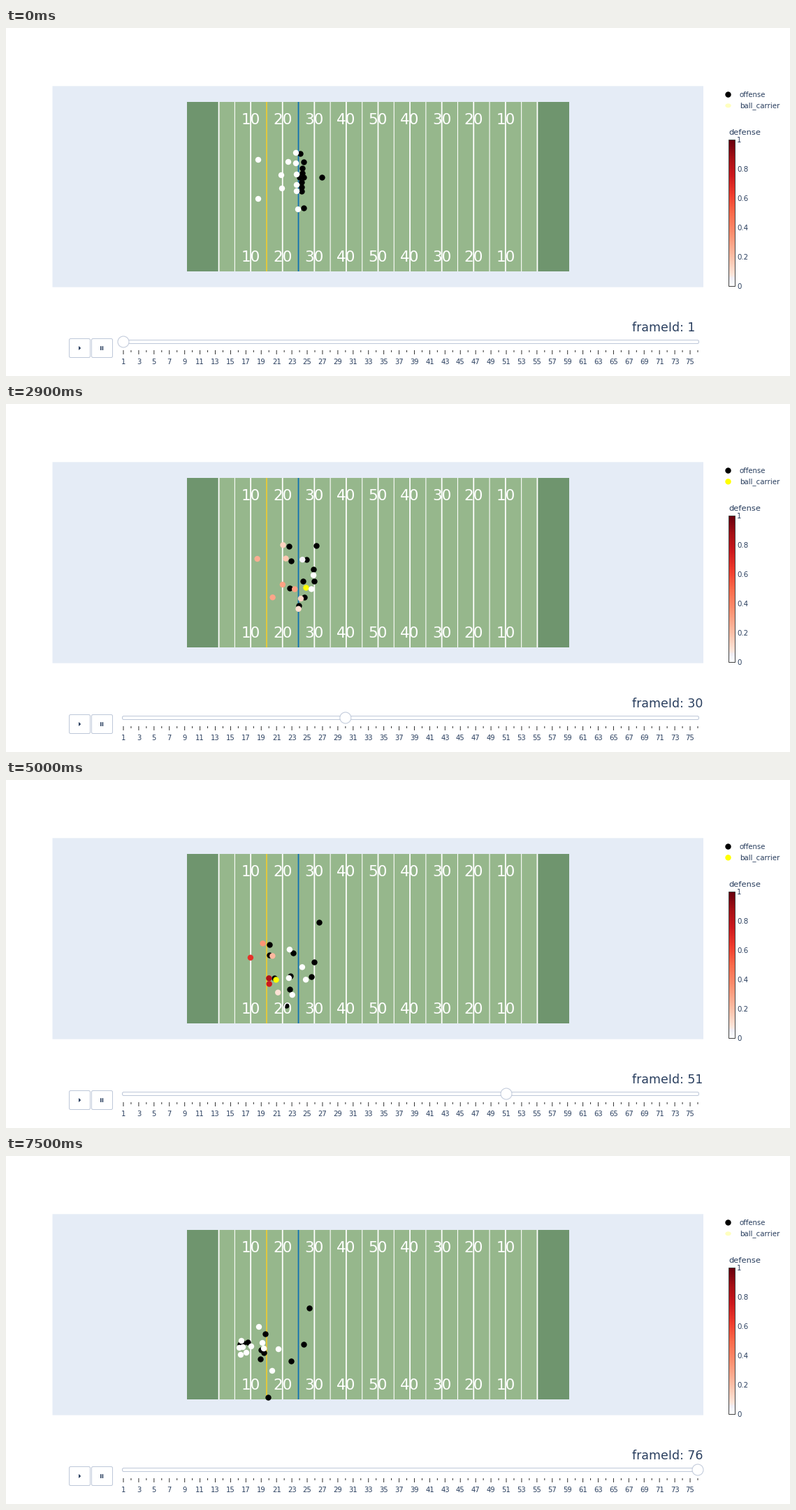
These frames come from a looping animation (1122x499 px, 7.6 s). A matplotlib script:

```python
import numpy as np
import matplotlib.pyplot as plt
from matplotlib.animation import FuncAnimation
from matplotlib.colors import LinearSegmentedColormap
from matplotlib.patches import Circle, Ellipse, FancyBboxPatch, Polygon, Rectangle

W, H, DPI = 1122, 499, 100
FRAMES, INTERVAL = 76, 100
SNAP, HANDOFF, WHISTLE = 6, 19, 71
INK, BORDER = "#2a3f5f", "#bec8d9"
PX = 72 / DPI

plt.rcParams["font.family"] = "DejaVu Sans"

# Every player runs a smooth route: line-up, halfway spot, final spot.
KEYS = np.array([8, 40, 76])
ROUTES = {
    "blockers": [
        [(424, 201), (396, 239), (339, 268)],
        [(424, 208), (445, 252), (426, 270)],
        [(420, 214), (422, 273), (369, 282)],
        [(423, 221), (446, 271), (408, 294)],
        [(423, 228), (395, 280), (365, 278)],
        [(423, 234), (423, 296), (364, 291)],
    ],
    "receivers": [
        [(421, 180), (393, 219), (346, 267)],
        [(426, 192), (427, 239), (371, 255)],
        [(426, 258), (413, 307), (375, 346)],
    ],
    "quarterback": [[(426, 214), (451, 200), (434, 218)]],
    "runner": [[(452, 214), (412, 284), (335, 270)]],
    "front": [
        [(415, 194), (423, 237), (362, 245)],
        [(416, 210), (444, 262), (367, 268)],
        [(416, 225), (442, 283), (390, 277)],
        [(416, 234), (421, 300), (381, 308)],
    ],
    "linebackers": [
        [(395, 230), (417, 281), (369, 276)],
        [(404, 192), (395, 238), (351, 273)],
        [(394, 211), (392, 280), (339, 274)],
    ],
    "corners": [
        [(418, 260), (412, 307), (336, 285)],
        [(415, 179), (384, 217), (337, 265)],
    ],
    "safeties": [
        [(361, 245), (387, 291), (344, 282)],
        [(361, 189), (357, 240), (334, 275)],
    ],
}
OFFENSE = ("blockers", "receivers", "quarterback", "runner")
DEFENSE = ("front", "linebackers", "corners", "safeties")
QUARTERBACK, RUNNER = 9, 10

REDS = LinearSegmentedColormap.from_list("reds", [
    (0, "#ffffff"), (.03, "#f6f6fa"), (.055, "#f0edf3"), (.08, "#fee5d9"), (.2, "#fcbfa7"),
    (.35, "#fc9272"), (.5, "#fb6a4a"), (.63, "#ef3b2c"), (.76, "#cb181d"),
    (.88, "#a50f15"), (1, "#67000d")])


def team(groups):
    return np.array([route for g in groups for route in ROUTES[g]], float)


def positions(routes, frame_id):
    """Cubic Hermite curve through the spots, at rest at both ends."""
    t = np.clip(frame_id, KEYS[0], KEYS[-1])
    slope = np.zeros_like(routes)
    slope[:, 1] = np.gradient(routes, KEYS, axis=1)[:, 1]
    i = int(t >= KEYS[1])
    span = KEYS[i + 1] - KEYS[i]
    u = (t - KEYS[i]) / span
    ease = u * u * (3 - 2 * u)
    return ((1 - ease) * routes[:, i] + ease * routes[:, i + 1]
            + span * u * (1 - u) * ((1 - u) * slope[:, i] - u * slope[:, i + 1]))


def tackle_chance(defenders, runner, frame_id):
    """High for defenders straight ahead of the runner, more so late in the play."""
    late = np.clip((frame_id - 40) / 11, 0, 1)
    reach = 1 + 5 * late
    ahead = runner[0] - defenders[:, 0]
    distance = np.hypot(*(defenders - runner).T)
    return np.clip((ahead + reach) / (distance + reach), 0, 1) * (.3 + .55 * late)


offense, defense = team(OFFENSE), team(DEFENSE)

fig = plt.figure(figsize=(W / DPI, H / DPI), dpi=DPI, facecolor="white")
ax = fig.add_axes([0, 0, 1, 1])


def rect(x0, y0, x1, y1, color, **kw):
    style = {"lw": 0, "snap": False, **kw}
    ax.add_patch(Rectangle((x0, y0), x1 - x0, y1 - y0, fc=color, **style))


def rounded(x0, y0, x1, y1, radius):
    ax.add_patch(FancyBboxPatch(
        (x0, y0), x1 - x0, y1 - y0, boxstyle=f"round,pad=0,rounding_size={radius}",
        fc="white", ec=BORDER, lw=PX))


def vline(x, y0, y1, color, width):
    ax.plot([x, x], [y0, y1], color=color, lw=width * PX, solid_capstyle="butt",
            snap=False, zorder=2)


def label(x, y, text, size, color=INK, ha="left"):
    """Text whose digits are centred on y."""
    return ax.text(x, y + .365 * size, text, fontsize=size * PX, color=color,
                   ha=ha, va="baseline", zorder=8)


def yard(n):
    return 259 + n * 547 / 120


def slider_x(frame_id):
    return 168 + (frame_id - 1) * 10.96


def draw_field():
    rect(66.5, 83.3, 998, 371.6, "#e5ecf6")
    rect(259, 106, 806, 349, "#96b78c")
    rect(259, 106, yard(10), 349, "#6f956e")
    rect(yard(110), 106, 806, 349, "#6f956e")
    for n in range(10, 111, 5):
        vline(yard(n), 106, 349, "white", 1.1 if n % 10 else 1.8)
    vline(yard(25), 106, 349, "#e3c62f", 1.8)
    vline(yard(35), 106, 349, "#0d70b0", 1.8)
    for n in range(20, 101, 10):
        for y in (130, 327):
            label(yard(n), y, str(50 - abs(60 - n)), 21.5, "white", "center")


def draw_legend():
    ax.add_patch(Circle((1033.5, 95.5), 4.2, fc="black", lw=0))
    label(1050, 95, "offense", 10.1)
    label(1050, 110.7, "ball_carrier", 10.2)
    label(1034, 148.6, "defense", 11.5)
    ax.imshow(np.linspace(1, 0, 211)[:, None], cmap=REDS, aspect="auto",
              extent=(1035, 1043, 371, 160), vmin=0, vmax=1)
    rect(1034.5, 160.5, 1043.5, 370.5, "none", ec="#444444", lw=PX)
    for k in range(6):
        label(1046.3, 370.5 - 42 * k, f"{k / 5:g}", 10.2)


def draw_controls():
    rounded(90.5, 445.5, 120.5, 472.5, 2)
    rounded(122.5, 445.5, 152.5, 472.5, 2)
    ax.add_patch(Polygon([(104, 456), (107.3, 459), (104, 462)], fc=INK, lw=0))
    for x in (135, 137.7):
        rect(x, 456.2, x + 1.5, 462, INK)
    rounded(166.5, 447.5, 991.5, 452.5, 2)
    for n in range(1, FRAMES + 1):
        major = n % 2
        vline(slider_x(n), 462, 468 if major else 465, "#333333", 1)
        if major:
            label(slider_x(n), 478, str(n), 10, ha="center")


draw_field()
draw_legend()
draw_controls()
ax.set(xlim=(0, W), ylim=(H, 0))
ax.axis("off")

handle = ax.add_patch(Circle((168, 450), 8, fc="white", ec=BORDER, lw=PX, zorder=5))
counter = label(896, 428.8, "", 17.35)
idle_key = ax.add_patch(Ellipse((1033.5, 111.3), 8.4, 6, fc="#ffffbf", lw=0))
active_key = ax.add_patch(Circle((1033.5, 111.3), 4.2, fc="#ffff00", lw=0))
marker = dict(s=(8.4 * PX) ** 2, linewidths=0, snap=False)
offense_dots = ax.scatter([], [], c="black", zorder=4, **marker)
carrier_dot = ax.scatter([], [], c="#ffff00", zorder=5, **marker)
defense_dots = ax.scatter([], [], zorder=6, **marker)


def update(i):
    frame_id = i + 1
    handle.center = (slider_x(frame_id), 450)
    counter.set_text(f"frameId: {frame_id}")

    live = SNAP <= frame_id <= WHISTLE
    active_key.set_visible(live)
    idle_key.set_visible(not live)

    attackers = positions(offense, frame_id)
    carrier = QUARTERBACK if frame_id < HANDOFF else RUNNER
    offense_dots.set_offsets(np.delete(attackers, carrier, axis=0) if live else attackers)
    carrier_dot.set_offsets(attackers[[carrier]])
    carrier_dot.set_visible(live)

    defenders = positions(defense, frame_id)
    chasing = HANDOFF <= frame_id <= WHISTLE
    chance = tackle_chance(defenders, attackers[RUNNER], frame_id) * chasing
    defense_dots.set_offsets(defenders)
    defense_dots.set_facecolor(REDS(chance))
    return ()


anim = FuncAnimation(fig, update, frames=FRAMES, interval=INTERVAL, repeat=True,
                     repeat_delay=0, blit=False)
plt.show()
```
